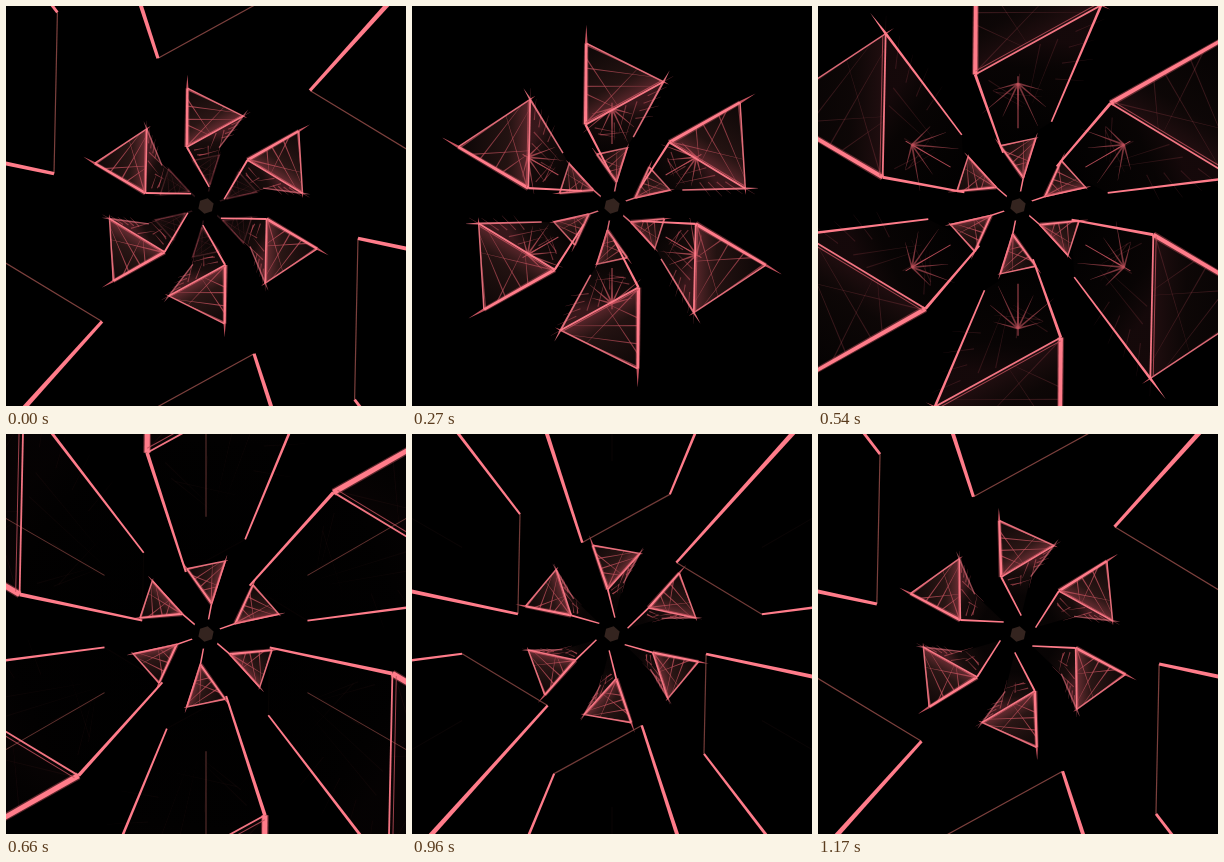
Write an HTML page with a canvas that moves like this. It is 400 px wide and 400 px high and loops after 1.2 s.

```html
<!DOCTYPE html>
<html>
<head>
<meta charset="utf-8">
<style>
html, body { margin: 0; width: 100%; height: 100%; overflow: hidden; background: #000; }
canvas { display: block; width: 400px; height: 400px; }
</style>
</head>
<body>
<canvas id="stage" width="400" height="400"></canvas>
<script>
const ctx = document.getElementById('stage').getContext('2d');
const LOOP = 1200, STEP = 30, CAP = 978, LENGTH = 612;
const PINK = '255,124,138', ROSE = '196,82,94', BROWN = '138,72,68';

// Prism corners as [size, degrees]: close to the camera, and far away.
const NEAR = { a: [60600, -18], b: [95200, 22.5], c: [116660, -9] };
const FAR = { a: [50300, 4], b: [110400, 16.5], c: [106200, -14.7] };

const clamp = (v, lo = 0, hi = 1) => Math.min(hi, Math.max(lo, v));
const lerp = (a, b, k) => a + (b - a) * k;
const mix = (p, q, k) => [lerp(p[0], q[0], k), lerp(p[1], q[1], k)];
const dist = p => Math.hypot(p[0], p[1]);

function polar(r, deg) {
  const a = deg * Math.PI / 180;
  return [r * Math.sin(a), -r * Math.cos(a)];
}

function corner(name, z) {
  const k = clamp((z - CAP) / 420, 0, 1.3), n = NEAR[name], f = FAR[name];
  return polar(lerp(n[0], f[0], k) / z, lerp(n[1], f[1], k));
}

function seeded(seed) {
  return () => (seed = (seed * 16807) % 2147483647) / 2147483647;
}

function poly(points, fill) {
  ctx.beginPath();
  points.forEach(p => ctx.lineTo(p[0], p[1]));
  ctx.closePath();
  ctx.fillStyle = fill;
  ctx.fill();
}

// A line whose width changes from w1 to w2.
function taper(p, q, w1, w2, color, alpha = 1) {
  if (alpha <= 0) return;
  const dx = q[0] - p[0], dy = q[1] - p[1], d = Math.hypot(dx, dy) || 1;
  const nx = -dy / d / 2, ny = dx / d / 2;
  poly([
    [p[0] + nx * w1, p[1] + ny * w1], [q[0] + nx * w2, q[1] + ny * w2],
    [q[0] - nx * w2, q[1] - ny * w2], [p[0] - nx * w1, p[1] - ny * w1]
  ], `rgba(${color},${alpha})`);
}

function shade(points, from, to, alpha) {
  const g = ctx.createLinearGradient(...from, ...to);
  g.addColorStop(0, `rgba(${ROSE},${alpha * 0.55})`);
  g.addColorStop(0.3, `rgba(${BROWN},${alpha * 0.3})`);
  g.addColorStop(1, `rgba(${BROWN},${alpha * 0.1})`);
  poly(points, g);
}

function cap(a, b, c, ae, be, z, alpha) {
  const detail = alpha * clamp((z - 280) / 500);
  const ab = [b[0] - a[0], b[1] - a[1]];
  const k = ((c[0] - a[0]) * ab[0] + (c[1] - a[1]) * ab[1]) / (ab[0] ** 2 + ab[1] ** 2);
  shade([a, b, c], mix(a, b, k), c, detail);
  shade([a, b, be, ae], mix(a, b, 0.5), mix(ae, be, 0.5), detail * 0.6);

  const rnd = seeded(77);
  for (let i = 0; i < 7; i++) {
    const p = mix(c, a, rnd()), q = mix(i % 2 ? a : c, b, 0.2 + rnd() * 0.7);
    taper(p, q, 1.3, 0.3, ROSE, detail * 0.75);
  }
  for (let i = 0; i < 6; i++) {
    const u = rnd(), v = rnd() * 0.4;
    const p = mix(mix(a, b, u), mix(ae, be, u), v);
    const q = mix(mix(a, b, rnd()), mix(ae, be, rnd()), 0.65);
    taper(p, q, 1.2, 0.2, ROSE, detail * 0.6);
  }
  // frayed right side
  for (let i = 0; i < 5; i++) {
    const p = mix(b, be, i * 0.16);
    taper(mix(p, a, 0.15), mix(p, a, -0.1 - rnd() * 0.08), 1.2, 0.2, ROSE, detail * 0.6);
  }

  const wide = 1.5 + dist(a) * 0.02;
  taper(a, c, wide + 2.5, wide + 1, ROSE, alpha * 0.45);
  taper(a, c, wide, wide * 0.8, PINK, alpha);
  taper(c, mix(a, c, 1.22), wide * 0.8, 0.1, ROSE, alpha);
  taper(c, b, 1.5, 1.5, PINK, alpha * 0.85);
  taper(b, mix(c, b, 1.07), 1.5, 0.1, ROSE, alpha);
  taper(a, b, 1.8, 1.8, PINK, alpha * 0.95);
  const lift = mix(a, c, 0.025), lift2 = mix(b, c, 0.025);
  taper(lift, lift2, 1, 1, ROSE, alpha * 0.8);
}

function prism(z) {
  const end = z + LENGTH;
  if (end < 60) return;
  const zc = Math.max(z, 40), far = clamp((end - 1000) / 600);
  const alpha = clamp((2250 - z) / 400);
  if (!alpha) return;
  const a = corner('a', zc), b = corner('b', zc), c = corner('c', zc);
  const ae = polar(NEAR.a[0] / end * (1 - far / 2), NEAR.a[1] + 28 * far);
  const be = polar(NEAR.b[0] / end, NEAR.b[1] - 10 * far);

  // far rim and middle ridge
  taper(ae, be, 1.2, 1.2, BROWN, clamp((950 - end) / 350) * 0.9);
  const ridge = 109000 / end;
  if (end > 600 && end < 1450) {
    const open = end < 950;
    const tip = open ? 300 : ridge * 1.25;
    taper([0, -ridge * (open ? 1 : 0.75)], [0, -tip], 1, 1, open ? BROWN : ROSE,
      open ? clamp((end - 600) / 300) * 0.7 : 0.9);
  }
  const star = clamp((end - 930) / 150) * clamp((1480 - end) / 150);
  for (let i = 0; i < 7 && star; i++) {
    const s = polar(ridge * (0.25 + (i % 3) * 0.1), 105 + i * 25);
    taper([0, -ridge * 1.18], [s[0], s[1] - ridge * 1.18], 2, 0.2, ROSE, star * 0.75);
  }

  if (z > 100) cap(a, b, c, ae, be, z, alpha);

  const wa = r => 1.2 + r * 0.013, wb = r => 0.9 + r * 0.008;
  taper(ae, a, wa(dist(ae)), wa(dist(a)), PINK, alpha);
  const side = alpha * (z > CAP ? 0.55 : lerp(1, 0.6, clamp((z - 600) / 300)));
  taper(be, b, wb(dist(be)), wb(dist(b)), PINK, side);
  if (z > 100) taper(b, mix(be, b, 1.2), wb(dist(b)), 0.1, PINK, side);
}

function draw(t) {
  ctx.setTransform(1, 0, 0, 1, 0, 0);
  ctx.fillStyle = '#000';
  ctx.fillRect(0, 0, 400, 400);
  for (let i = 0; i < 6; i++) {
    ctx.setTransform(1, 0, 0, 1, 200, 200);
    ctx.rotate(i * Math.PI / 3);
    for (let n = 1; n >= -1; n--) prism(CAP + LOOP * n - t);
  }
  ctx.setTransform(1, 0, 0, 1, 200, 200);
  const hex = r => Array.from({ length: 6 }, (_, i) => polar(r, i * 60 + 12));
  poly(hex(15), '#000');
  poly(hex(8), '#34241f');
}

const start = performance.now();
function tick() {
  const t = (performance.now() - start) % LOOP;
  draw(Math.floor(t / STEP) * STEP);
  requestAnimationFrame(tick);
}
tick();
</script>
</body>
</html>
```
